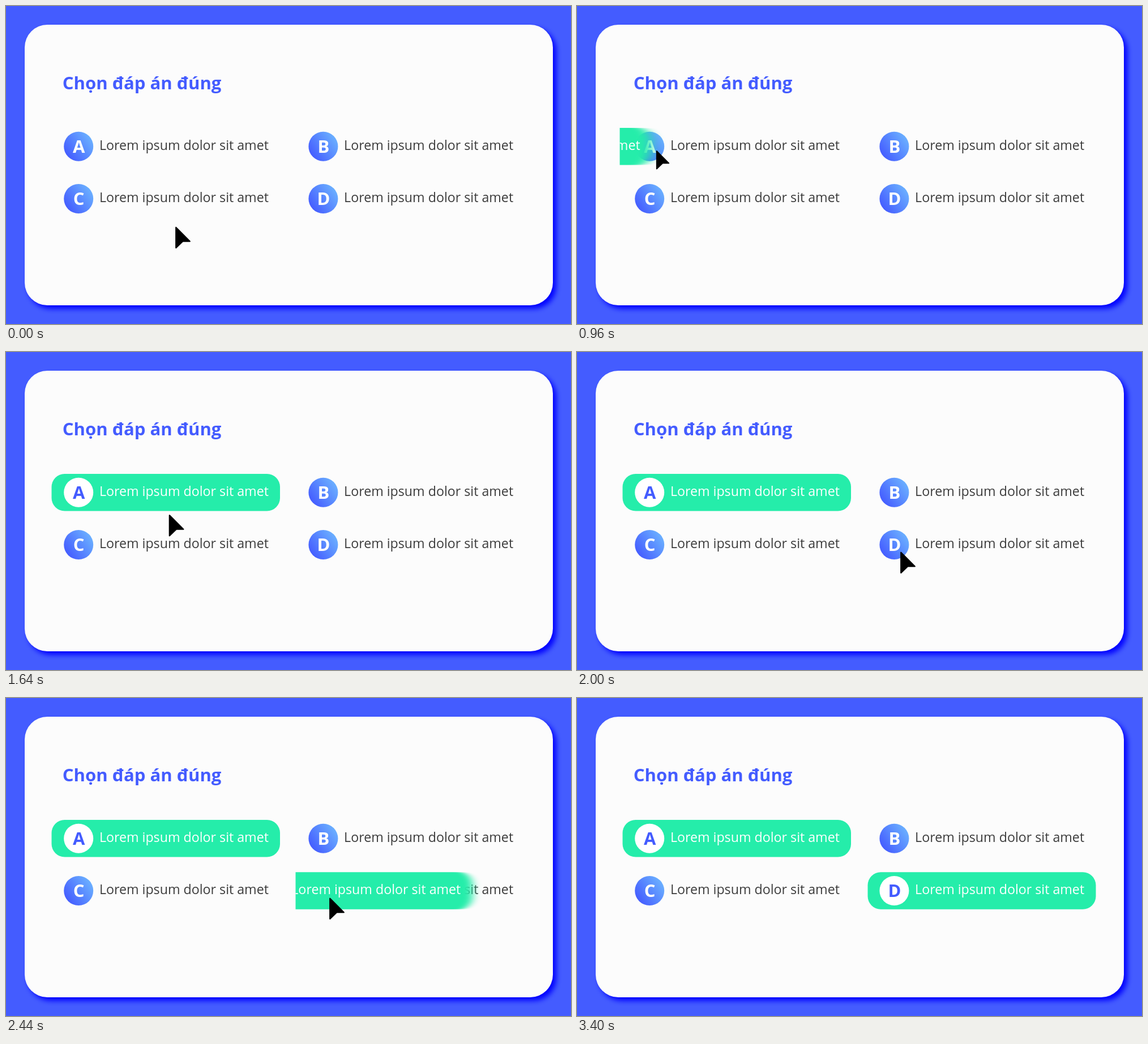
Recreate the animation shown at these times as an HTML page. Size 998 by 561 pixels, loop 4 s.

```html
<!DOCTYPE html>
<html lang="vi">
<head>
<meta charset="utf-8">
<title>Quiz</title>
<style>
  html, body { margin: 0; width: 100%; height: 100%; overflow: hidden; background: #445cff; }
  svg { display: block; width: 100vw; height: 100vh; }
  text { font-family: "Open Sans", "Noto Sans", sans-serif; }
  .title { font-size: 31.1px; font-weight: 700; fill: #445cff; }
  .letter { font-size: 31px; font-weight: 700; text-anchor: middle; }
  .label { font-size: 23.2px; }
</style>
</head>
<body>
<svg id="stage" viewBox="0 0 998 561" xmlns="http://www.w3.org/2000/svg">
  <defs>
    <linearGradient id="badge" x1="0.08" y1="0.8" x2="0.92" y2="0.2">
      <stop offset="0" stop-color="#445cff"/>
      <stop offset="1" stop-color="#6bb0ff"/>
    </linearGradient>
    <filter id="shadow" filterUnits="userSpaceOnUse" x="0" y="0" width="998" height="561">
      <feGaussianBlur stdDeviation="5"/>
    </filter>
  </defs>
  <rect width="998" height="561" fill="#445cff"/>
  <rect x="39" y="39" width="933" height="495" rx="40" fill="#00f" filter="url(#shadow)"/>
  <rect x="33" y="33" width="933" height="495" rx="40" fill="#fcfcfc"/>
  <text class="title" x="99.8" y="147">Chọn đáp án đúng</text>
  <g id="answers"></g>
  <g id="banners"></g>
  <path id="cursor" d="M1.2 1.6 L25.8 26.2 H13.2 L1.2 37.6 Z" stroke="#000" stroke-width="2.2" stroke-linejoin="round"/>
</svg>
<script>
const LOOP = 4000, STEP = 40;
const byId = id => document.getElementById(id);
const clamp = v => Math.min(1, Math.max(0, v));
const span = (t, start, length) => clamp((t - start) / length);
const easeInOut = u => (1 - Math.cos(Math.PI * u)) / 2;
const easeOut = u => 1 - (1 - u) ** 2;
const mix = (a, b, p) => a + (b - a) * p;

// Badge with its letter and the answer text beside it
const answer = (letter, cx, cy, disc, ink, textColor) => `
  <circle cx="${cx}" cy="${cy}" r="26" fill="${disc}"/>
  <text class="letter" x="${cx + 0.5}" y="${cy + 11.2}" fill="${ink}">${letter}</text>
  <text class="label" x="${cx + 36.7}" y="${cy + 6.3}" fill="${textColor}">Lorem ipsum dolor sit amet</text>`;

byId('answers').innerHTML = [
  ['A', 128.2, 247.7], ['B', 560.4, 247.7],
  ['C', 128.2, 340], ['D', 560.4, 340]
].map(a => answer(...a, 'url(#badge)', '#fff', '#3c3c3c')).join('');

const banners = [
  { letter: 'A', cx: 128.2, cy: 247.7, left: 80.5, right: 484, edge: 75.5, start: 940 },
  { letter: 'D', cx: 560.4, cy: 340, left: 513.5, right: 916.5, edge: 511.5, start: 2294 }
];
const SLIDE = 280;

byId('banners').innerHTML = banners.map(b => `
  <clipPath id="clip${b.letter}"><rect x="${b.edge}" width="${b.right - b.edge + 2}" height="561"/></clipPath>
  <filter id="blur${b.letter}" filterUnits="userSpaceOnUse" x="0" y="0" width="998" height="561" color-interpolation-filters="sRGB">
    <feGaussianBlur stdDeviation="8 0"/>
  </filter>
  <g id="banner${b.letter}" clip-path="url(#clip${b.letter})"><g>
    <rect x="${b.left}" y="${b.cy - 32.7}" width="${b.right - b.left}" height="65.4" rx="23" fill="#25edaa"/>
    ${answer(b.letter, b.cx, b.cy, '#fff', '#445cff', '#fff')}
  </g></g>`).join('');

for (const b of banners) {
  b.node = byId('banner' + b.letter);
  b.body = b.node.querySelector('g');
  b.plate = b.node.querySelector('rect');
  b.blur = byId('blur' + b.letter).firstElementChild;
}

function drawBanner(b, t) {
  const u = span(t, b.start, SLIDE);
  b.node.style.display = u > 0 ? '' : 'none';
  const shift = (b.edge - b.right) * (1 - easeOut(u));
  b.body.setAttribute('transform', `translate(${shift} 0)`);
  // The leading edge is soft while the banner is moving
  b.blur.setAttribute('stdDeviation', `${11 * Math.sqrt(1 - u)} 0`);
  if (u < 1) b.plate.setAttribute('filter', `url(#blur${b.letter})`);
  else b.plate.removeAttribute('filter');
}

const moves = [
  { start: 0, length: 600, from: [299, 389], to: [138, 252], ease: easeInOut },
  { start: 1400, length: 600, from: [138, 252], to: [571, 352], ease: easeInOut },
  { start: 3003, length: 397, from: [571, 352], to: [644, 418], ease: easeOut }
];
const press = (t, start) => Math.sin(Math.PI * span(t, start, 260));

function drawCursor(t) {
  const cursor = byId('cursor');
  cursor.style.display = t < 3400 ? '' : 'none';
  const m = moves.filter(v => t >= v.start).pop();
  const p = m.ease(span(t, m.start, m.length));
  const [x, y] = m.from.map((v, i) => mix(v, m.to[i], p));
  const scale = 1 - 0.13 * (press(t, 820) + press(t, 2145));
  cursor.setAttribute('transform',
    `translate(${x + 13.5} ${y + 19.5}) scale(${scale}) translate(-13.5 -19.5)`);
}

function draw(time) {
  const t = Math.floor((time % LOOP) / STEP) * STEP;
  banners.forEach(b => drawBanner(b, t));
  drawCursor(t);
}

const origin = performance.now();
function tick() {
  draw(performance.now() - origin);
  requestAnimationFrame(tick);
}
tick();
</script>
</body>
</html>
```
